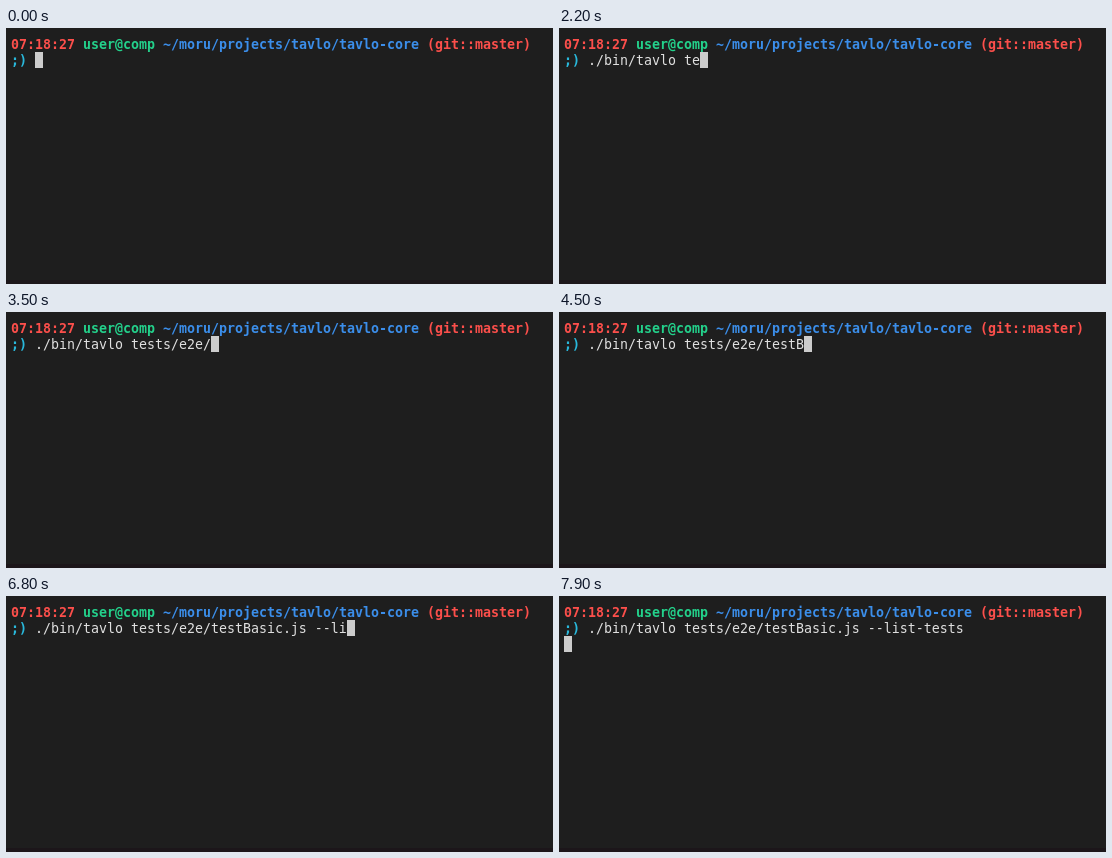
An HTML page that plays this animation: 547 px wide and 256 px high, repeating every 8000 ms.

```html
<!DOCTYPE html>
<html lang="en">
<head>
<meta charset="utf-8">
<title>Terminal</title>
<style>
  html, body { margin: 0; width: 100%; height: 100%; overflow: hidden; background: #1e1e1e; }
  svg { display: block; }
  text { font: 13.29px "DejaVu Sans Mono", monospace; fill: #dfdfdf; white-space: pre; }
  .prompt text { font-weight: bold; }
  .prompt .red { fill: #fc4f4b; }
  .prompt .green { fill: #23d18b; }
  .prompt .blue { fill: #3b8eea; }
  .prompt .cyan { fill: #29b8db; }
</style>
</head>
<body>
<svg width="547" height="256" viewBox="0 0 547 256">
  <rect width="547" height="256" fill="#1e1e1e"/>
  <rect y="252" width="547" height="4" fill="#1c161a"/>
  <g class="prompt">
    <text class="red" x="5" y="21">07:18:27</text>
    <text class="green" x="77" y="21">user@comp</text>
    <text class="blue" x="157" y="21">~/moru/projects/tavlo/tavlo-core</text>
    <text class="red" x="421" y="21">(git::master)</text>
    <text class="cyan" x="5" y="37">;)</text>
  </g>
  <text id="typed" x="29" y="37"></text>
  <rect id="cursor" width="8" height="16" fill="#ccc"/>
</svg>
<script>
  const LOOP = 8000, START = 500, TICK = 100;
  const CELL = 8, LEFT = 5, LINE = 16, TOP = 24, PROMPT_CELLS = 3;
  // One key per tick; an underscore is a tick of rest. Enter follows the last key.
  const script = "./bi_n_/tav_lo_ test_s_/e_2_e_/t_es__t__B_a_sic__.___j_s ___--lis_t-_tests";
  const typed = document.getElementById("typed");
  const cursor = document.getElementById("cursor");

  function draw(time) {
    const ticks = Math.max(0, Math.floor((time - START) / TICK) + 1);
    const text = script.slice(0, ticks).replaceAll("_", "");
    const entered = ticks > script.length;
    const column = entered ? 0 : PROMPT_CELLS + text.length;
    typed.textContent = text;
    cursor.setAttribute("x", LEFT + column * CELL);
    cursor.setAttribute("y", entered ? TOP + LINE : TOP);
  }

  const start = performance.now();
  function tick() {
    draw((performance.now() - start) % LOOP);
    requestAnimationFrame(tick);
  }
  tick();
</script>
</body>
</html>
```
